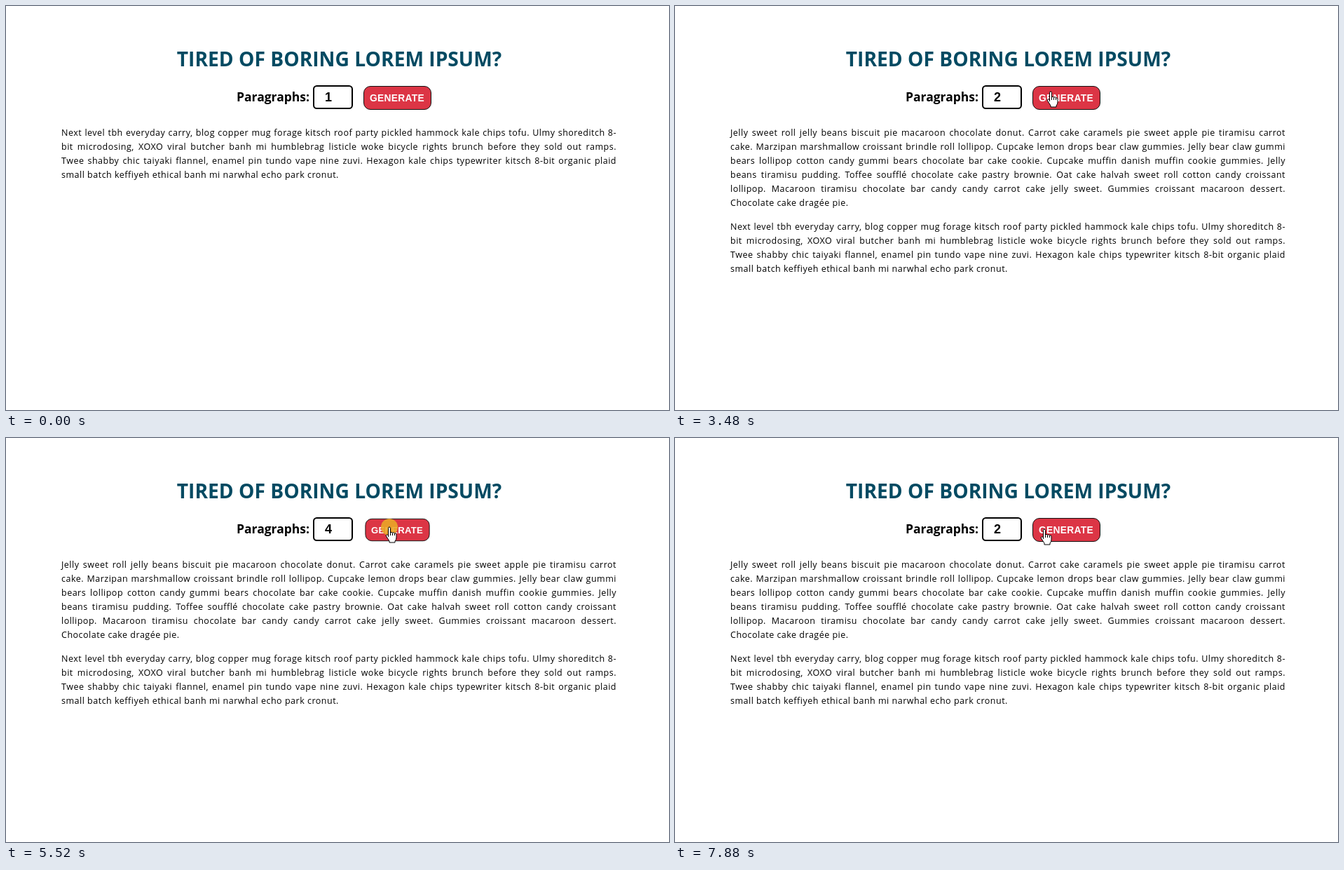
An HTML page that plays this animation: 946x576 px, repeating every 8 s.

```html
<!DOCTYPE html>
<html lang="en">
<head>
<meta charset="utf-8">
<title>Lorem generator</title>
<style>
  html, body { margin: 0; width: 100%; height: 100%; overflow: hidden; background: #fff; }
  #stage { position: relative; width: 946px; height: 576px; overflow: hidden; }
  svg { position: absolute; left: 0; top: 0; }
  svg text { font-family: "Open Sans", "Noto Sans", sans-serif; font-weight: 700; }
  svg .arial { font-family: "Liberation Sans", Arial, sans-serif; }
  #copy {
    position: absolute; left: 79px; top: 171px; width: 792px;
    font: 12.5px/20px "Open Sans", "Noto Sans", sans-serif; letter-spacing: .5px;
  }
  #copy p { margin: 0 0 14.4px; }
  #copy p div { height: 20px; white-space: nowrap; word-spacing: -1px; text-align: justify; text-align-last: justify; }
  #copy p div:last-child { word-spacing: 0; text-align-last: left; }
</style>
</head>
<body>
<div id="stage">
  <div id="copy"></div>
  <svg width="946" height="576" viewBox="0 0 946 576">
    <g id="form">
      <text x="475.5" y="86" font-size="28.2" text-anchor="middle" fill="#034a62">TIRED OF BORING LOREM IPSUM?</text>
      <text x="329" y="136" font-size="17.5">Paragraphs:</text>
      <rect x="439" y="114" width="55" height="32" rx="4.5" fill="#fff" stroke="#000" stroke-width="2"/>
      <g id="spin">
        <rect x="479" y="119" width="14" height="23" fill="#efefef"/>
        <rect id="half" x="479" width="14" height="11.5" fill="#c6c6c6"/>
        <path d="M483 127l3-3 3 3zM483 134.5l3 3 3-3z" fill="#4c4c4c"/>
      </g>
      <text id="value" class="arial" x="455" y="136" font-size="18"></text>
      <path id="caret" d="M465.5 120V139" stroke="#000"/>
      <g id="button">
        <rect x="510.5" y="114.5" width="96" height="33" rx="9.5" fill="#dc3545" stroke="#111"/>
        <text class="arial" x="519" y="136" font-size="13.8" letter-spacing=".3" fill="#fff">GENERATE</text>
      </g>
    </g>
    <g id="mouse">
      <circle id="ring" r="12" fill="#e9aa27" fill-opacity=".88"/>
      <path id="arrow" d="M.5 .5V16L4 12.7 6.3 18.2 8.7 17.2 6.4 11.7H11.2Z" fill="#fff" stroke="#000"/>
      <g id="hand" fill="#fff" stroke="#000">
        <path d="M-1.5 14V1.500a1.500 1.500 0 0 1 3 0V8q1.500-1.600 3 .2q1.800-1.200 3 .6q2.200-.8 2.500 1.600V15q0 3-2 5v2h-8v-2l-4.500-7q-.8-2 1-2.200q1.300.2 2 1.700Z"/>
        <path d="M1.500 8v4M4.500 8.500v3.500M7.500 9v3" fill="none"/>
      </g>
      <path id="beam" d="M-3.500-8.500H-1L0-7.500 1-8.500H3.500M0-7.500V7.500M-3.500 8.500H-1L0 7.500 1 8.500H3.500" fill="none" stroke="#000"/>
    </g>
  </svg>
</div>
<script>
const LOOP = 8000;
const $ = id => document.getElementById(id);

const sweet = `Jelly sweet roll jelly beans biscuit pie macaroon chocolate donut. Carrot cake caramels pie sweet apple pie tiramisu carrot
cake. Marzipan marshmallow croissant brindle roll lollipop. Cupcake lemon drops bear claw gummies. Jelly bear claw gummi
bears lollipop cotton candy gummi bears chocolate bar cake cookie. Cupcake muffin danish muffin cookie gummies. Jelly
beans tiramisu pudding. Toffee soufflé chocolate cake pastry brownie. Oat cake halvah sweet roll cotton candy croissant
lollipop. Macaroon tiramisu chocolate bar candy candy carrot cake jelly sweet. Gummies croissant macaroon dessert.
Chocolate cake dragée pie.`;

const hip = `Next level tbh everyday carry, blog copper mug forage kitsch roof party pickled hammock kale chips tofu. Ulmy shoreditch 8-
bit microdosing, XOXO viral butcher banh mi humblebrag listicle woke bicycle rights brunch before they sold out ramps.
Twee shabby chic taiyaki flannel, enamel pin tundo vape nine zuvi. Hexagon kale chips typewriter kitsch 8-bit organic plaid
small batch keffiyeh ethical banh mi narwhal echo park cronut.`;

const undead = `Zombie ipsum reversus ab viral inferno, nam dorn halvek malum cerebro. De carne lumbering animata corpora quaeritis.
Summus brains sit, morbo vel maleficia? De apocalypsi gorger omero undead survivor dictum mauris. Hi mindless mortuis
soulless creaturas, imo evil stalking monstra adventus resi dentevil vultus comedat cerebella viventium. Qui animated corpse,
cricket bat lon trevik terribilem incessu zomby. The voodoo sacerdos flesh eater, suscitat mortuos comedere carnem virus.
Zonbi tattered for solum oculi eorum defunctis go lum cerebro. Nescio brains an Undead zombies. Sicut malus putrid
voodoo horror. Nigh tofth eliv ingdead.`;

// The trailing break keeps both visible lines justified.
const cat = `Cat gets stuck in tree firefighters try to get cat down firefighters get stuck in tree cat eats firefighters' slippers kitty power
ignore the squirrels, you'll never catch them anyway for what a cat-ass-trophy! or purr as loud as possible, be the most
`;

const paras = [sweet, hip, undead, cat].map(text => {
  const p = document.createElement('p');
  for (const line of text.split('\n')) {
    p.appendChild(document.createElement('div')).textContent = line;
  }
  return $('copy').appendChild(p);
});

// Each move eases to a point, optionally curving past a bend.
const origin = { x: 600, y: 458 };
const moves = [
  { from: 190, to: 390, x: 494, y: 373 },
  { from: 530, to: 1340, x: 478, y: 133, bend: { x: 412, y: 217 } },
  { from: 1400, to: 1950, x: 482, y: 127 },
  { from: 2550, to: 2820, x: 537, y: 123 },
  { from: 3420, to: 4230, x: 486, y: 125, bend: { x: 512, y: 94 } },
  { from: 5120, to: 5380, x: 547, y: 127 },
  { from: 5920, to: 6530, x: 478, y: 136, bend: { x: 514, y: 146 } },
  { from: 7290, to: 7730, x: 527, y: 130, bend: { x: 500, y: 142 } }
];

// A step changes the number field; without one the click generates.
const clicks = [
  { at: 2090, hold: 190, step: 1 },
  { at: 2950, hold: 140 },
  { at: 4500, hold: 70, step: 1 },
  { at: 4700, hold: 140, step: 1 },
  { at: 5520, hold: 60 },
  { at: 6790, hold: 90, step: -1 },
  { at: 7050, hold: 80, step: -1 },
  { at: 7730, hold: 70 }
];

const show = (id, on) => $(id).style.display = on ? '' : 'none';
const ease = u => u * u * (3 - 2 * u);
const curve = (a, b, c, u) => (1 - u) ** 2 * a + 2 * u * (1 - u) * b + u * u * c;

function pointer(t) {
  let p = origin;
  for (const m of moves) {
    if (t < m.from) break;
    const u = ease(Math.min(1, (t - m.from) / (m.to - m.from)));
    const bend = m.bend || { x: (p.x + m.x) / 2, y: (p.y + m.y) / 2 };
    p = { x: curve(p.x, bend.x, m.x, u), y: curve(p.y, bend.y, m.y, u) };
  }
  return p;
}

function formState(t) {
  const s = { value: 1, count: 1, step: 0, down: false };
  for (const c of clicks) {
    if (t < c.at) break;
    s.step = c.step || 0;
    s.value += s.step;
    s.down = t < c.at + c.hold;
    if (!s.step && !s.down) s.count = s.value;
  }
  return s;
}

function draw(t) {
  const { x, y } = pointer(t);
  const { value, count, step, down } = formState(t);
  const focus = step !== 0;
  const shift = count > 2 ? -9 : 0;      // room taken by the scrollbar
  const px = x - shift;
  const live = t >= 260;
  const onInput = live && px >= 438 && px <= 498 && y >= 113 && y <= 147;
  const onSpin = onInput && px >= 479;
  const onButton = live && px >= 510 && px <= 607 && y >= 114 && y <= 148;

  paras.forEach((p, i) => p.style.display = (count === 1 ? i === 1 : i < count) ? '' : 'none');
  $('copy').style.transform = `translateX(${shift}px)`;
  $('copy').style.color = focus ? '#1c1c1c' : '#000';
  $('form').setAttribute('transform', `translate(${shift} 0)`);

  $('value').textContent = value;
  show('caret', step < 0);
  show('spin', onInput || focus);
  show('half', onSpin);
  $('half').setAttribute('y', y < 130.5 ? 119 : 130.5);
  $('button').setAttribute('transform', down && onButton
    ? 'translate(558.5 131) scale(.95) translate(-558.5 -131)' : '');

  show('mouse', live);
  $('mouse').setAttribute('transform', `translate(${Math.round(x)} ${Math.round(y)})`);
  show('ring', down);
  show('hand', onButton);
  show('beam', onInput && !onSpin);
  show('arrow', !onButton && (!onInput || onSpin));
}

const start = performance.now();
function tick() {
  draw((performance.now() - start) % LOOP);
  requestAnimationFrame(tick);
}
tick();
</script>
</body>
</html>
```
